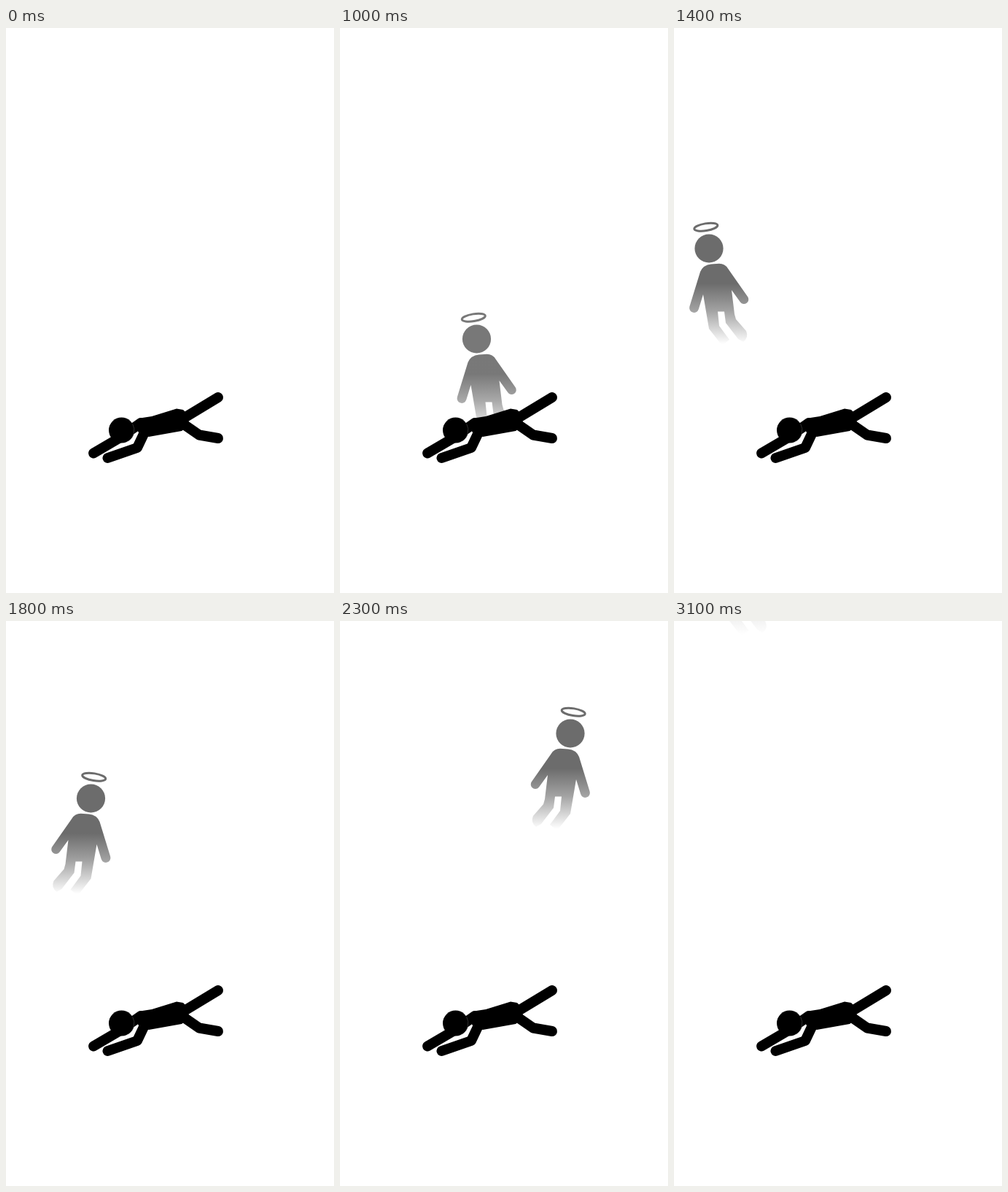
Recreate the animation shown at these times as an HTML page with a canvas. Size 450 by 774 pixels, loop 3600 ms.

```html
<!DOCTYPE html>
<html lang="en">
<head>
<meta charset="utf-8">
<title>Leaving the body</title>
<style>
html, body { margin: 0; width: 100%; height: 100%; overflow: hidden; background: #fff; }
canvas { display: block; width: 450px; height: 774px; }
</style>
</head>
<body>
<canvas id="stage" width="450" height="774"></canvas>
<script>
const ctx = document.getElementById('stage').getContext('2d');
const LOOP = 3600, STEP = 100, GREY = '108,108,108';
const clamp = (v, lo, hi) => Math.min(hi, Math.max(lo, v));

// Flight path: time, middle of the figure, height of the head
const path = [
  [1000, 201, 426], [1100, 187, 415], [1400, 61.5, 302], [1500, 56, 288],
  [1600, 59, 274], [1700, 73, 259.5], [1800, 103, 243], [2050, 226, 197],
  [2200, 283, 169], [2300, 302.5, 154], [2400, 302, 149], [2700, 240.5, 125.5],
  [2900, 174.5, 15], [3100, 88, -112]
];

function along(t, k) {
  const last = path.length - 1;
  let i = 0;
  while (i < last - 1 && t >= path[i + 1][0]) i++;
  const slope = n => {
    const a = path[Math.max(0, n - 1)], b = path[Math.min(last, n + 1)];
    return (b[k] - a[k]) / (b[0] - a[0]);
  };
  const a = path[i], b = path[i + 1], d = b[0] - a[0];
  const u = clamp((t - a[0]) / d, 0, 1), v = 1 - u;
  return v * v * (1 + 2 * u) * a[k] + u * u * (3 - 2 * u) * b[k]
    + d * u * v * (v * slope(i) - u * slope(i + 1));
}

function lines(...pts) {
  for (const [x, y] of pts) ctx.lineTo(x, y);
}

function disc(x, y, r) {
  ctx.beginPath();
  ctx.arc(x, y, r, 0, 7);
  ctx.fill();
}

function limb(...pts) {
  ctx.beginPath();
  lines(...pts);
  ctx.stroke();
}

// Drawn with the head at the origin, fading towards the feet
function drawGhost(t) {
  const fadeIn = (t - 560) / 480, fadeOut = 1 - (t - 2575) / 760;
  const facing = t >= 1500 && t < 2400 ? -1 : 1;
  ctx.save();
  ctx.globalAlpha = clamp(Math.min(fadeIn, fadeOut), 0, 1);
  ctx.translate(along(t, 1), along(t, 2));
  ctx.scale(facing, 1);
  ctx.translate(-13.5, 0);

  ctx.fillStyle = ctx.strokeStyle = `rgb(${GREY})`;
  disc(0, 0, 19.6);
  ctx.lineWidth = 3;
  ctx.beginPath();
  ctx.ellipse(-4.2, -29.3, 16.2, 4.9, -0.16, 0, 7);
  ctx.stroke();

  const fade = ctx.createLinearGradient(0, 48, 0, 131);
  [[0, 1], [0.45, 0.63], [0.7, 0.34], [1, 0]].forEach(([at, a]) =>
    fade.addColorStop(at, `rgba(${GREY},${a})`));
  ctx.fillStyle = fade;
  ctx.beginPath();
  ctx.moveTo(-12, 32);
  ctx.quadraticCurveTo(-8, 22.5, 3, 21.5);
  ctx.lineTo(14, 20.8);
  ctx.quadraticCurveTo(22, 21, 26, 27.5);
  lines([53, 66]);
  ctx.arc(48, 69.8, 6.3, -0.64, 2.5);
  lines([31, 57], [35, 90], [37, 97], [51, 113]);
  ctx.quadraticCurveTo(55, 122, 47, 128);
  lines([40, 124], [23, 102], [21, 86.5], [12, 86.5], [14, 106], [28, 125],
    [18, 133], [0, 110], [-8, 63], [-14.3, 83.5]);
  ctx.arc(-20.5, 81.5, 6.4, 0.3, 3.44);
  ctx.closePath();
  ctx.fill();
  ctx.restore();
}

function drawBody() {
  ctx.fillStyle = ctx.strokeStyle = '#000';
  ctx.lineWidth = 14;
  ctx.lineCap = ctx.lineJoin = 'round';
  limb([120, 582.5], [155, 562], [185, 541]);
  limb([139.5, 589], [180, 575], [190, 554]);
  limb([291, 506], [243, 535]);
  limb([291, 562], [265, 557.5], [244, 543]);
  ctx.beginPath();
  lines([176, 543], [187, 534], [200, 532], [234, 521.5], [243, 523],
    [251, 531], [250, 545], [241, 552], [196, 560], [183, 556]);
  ctx.closePath();
  ctx.fill();
  disc(158.5, 551, 17.5);
  ctx.strokeStyle = '#3c3c3c';
  ctx.lineWidth = 0.8;
  ctx.beginPath();
  ctx.arc(158.5, 551, 17.5, -0.5, 1);
  ctx.stroke();
}

function draw(now) {
  const t = Math.floor((now % LOOP) / STEP) * STEP;
  ctx.fillStyle = '#fff';
  ctx.fillRect(0, 0, 450, 774);
  if (t >= 600) drawGhost(Math.min(t, 3100));
  drawBody();
}

const start = performance.now();
function tick() {
  draw(performance.now() - start);
  requestAnimationFrame(tick);
}
tick();
</script>
</body>
</html>
```
